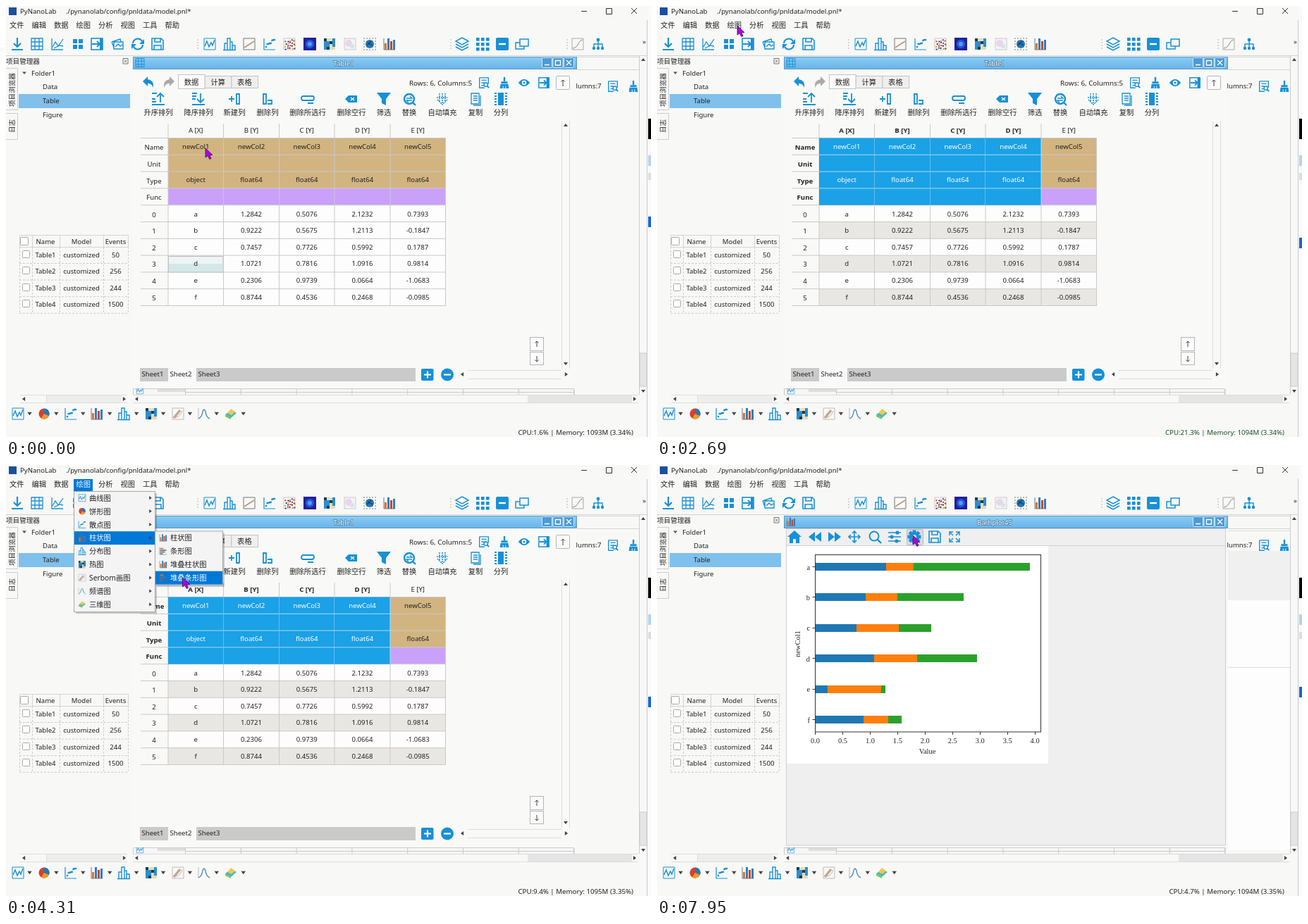
Write an HTML page that moves like this. It is 915 px wide and 612 px high and loops after 8 s.

```html
<!DOCTYPE html>
<html lang="zh">
<head>
<meta charset="utf-8">
<title>PyNanoLab</title>
<style>
html,body{margin:0;width:100%;height:100%;overflow:hidden;background:#f8f8f7}
svg{display:block;width:100vw;height:100vh}
text{font-family:'Noto Sans','Noto Sans CJK SC','Noto Sans CJK',sans-serif;font-size:9.6px;fill:#222}
.zh{font-size:10.3px}
.serif text{font-family:'Liberation Serif',serif;font-size:10.4px}
</style>
</head>
<body>
<svg id="stage" viewBox="0 0 915 612"></svg>
<script>
const BLUE = '#1790d6', SEL = '#1ba1e6', MENU = '#0078d7', LINE = '#c9c9c9';
const PLOT = ['#1f77b4', '#ff7f0e', '#2ca02c'];
const HUES = ['#d9772f', '#2b7fc0', '#c8452f', '#2b7fc0'];

const rect = (x, y, w, h, fill, stroke = 'none', more = '') =>
  `<rect x="${x}" y="${y}" width="${w}" height="${h}" fill="${fill}" stroke="${stroke}" ${more}/>`;
const path = (d, stroke = BLUE, w = 1.5, fill = 'none') =>
  `<path d="${d}" stroke="${stroke}" stroke-width="${w}" fill="${fill}"/>`;
const solid = (d, fill = BLUE) => path(d, 'none', 0, fill);
const dot = (x, y, r, fill = BLUE) => `<circle cx="${x}" cy="${y}" r="${r}" fill="${fill}"/>`;
const ring = (x, y, r, w) => `<circle cx="${x}" cy="${y}" r="${r}" fill="none" stroke="${BLUE}" stroke-width="${w}"/>`;
const text = (x, y, s, more = '') => `<text x="${x}" y="${y}" ${more}>${s}</text>`;
const zh = (x, y, s, more = '') => text(x, y, s, `class="zh" ${more}`);
const mid = (x, y, s, more = '') => text(x, y, s, `text-anchor="middle" ${more}`);
const at = (x, y, body, k = 1) => `<g transform="translate(${x} ${y}) scale(${k})">${body}</g>`;
const group = (id, body) => `<g id="${id}">${body}</g>`;
const each = (n, f) => Array.from({ length: n }, (_, i) => f(i)).join('');
const noise = i => { const v = Math.sin(i * 12.9898 + 78.233) * 43758.5453; return v - Math.floor(v); };
const tri = (x, y, dir, s = 3) =>
  `<path d="M${-s * .7} ${-s}L${s * .7} 0L${-s * .7} ${s}Z" fill="#444" transform="translate(${x} ${y}) rotate(${dir})"/>`;

const FRAME = 'M-8-8H8V8H-8Z', AXES = 'M-8-8V8H8', BEND = 'M-8-1L-1-8V-4Q8-3 7 8Q4 1-1 2V6Z';
const icon = {
  down: path('M0-9V4M-5-1L0 4L5-1M-8 8H8', BLUE, 2.2),
  grid: path(FRAME + 'M-8-3H8M-8 3H8M-3-8V8M3-8V8', BLUE, 1.3),
  chart: path(AXES + 'M-7 4L-3-3L1 3L8-7M-5 6L3 2L8 3', BLUE, 1.3),
  four: each(4, i => rect(i % 2 ? 1 : -7, i > 1 ? 1 : -7, 6, 6, BLUE)),
  into: rect(-8, -8, 16, 16, 'none', BLUE, 'stroke-width="1.6"') + rect(4, -8, 4, 16, BLUE) + path('M-7 0H3M0-4L4 0L0 4', BLUE, 2),
  cards: path('M-8-3L4-7L5-3M-5-3H8V7H-5ZM-8-3L-5 5M-3 4L1 0L4 3L7 1', BLUE, 1.4),
  refresh: path('M-7-1A7 7 0 0 1 6-4M7 1A7 7 0 0 1-6 4', BLUE, 2.2) + solid('M9-7V0H2ZM-9 7V0H-2Z'),
  save: path('M-8-8H5L8-5V8H-8ZM-4-8V-3H4V-8M-5 8V2H5V8', BLUE, 1.6),
  line: path(FRAME, BLUE, 1) + path('M-7 3L-4-4L-1 4L2-2L4 2L7-6', BLUE, 1.5),
  hist: path('M-9 8.5H9M-7 8V-1H-3M-3 8V-8H1V8M1-3H4V8M4 2H8V8', BLUE, 1.4),
  fit: path(FRAME, '#777', 1) + path('M-7 5L7-4', '#b89572', 1.5),
  scatter: path(AXES, BLUE, 1.2) + each(8, i => dot(-5 + i * 1.7, 5 - i * 1.2 - 5 * noise(i), 1.4)),
  confetti: path(FRAME, '#bbb', .8) + each(20, i => dot(-6 + i % 5 * 3 + 2 * noise(i), -6 + (i / 5 | 0) * 3.6 + 3 * noise(i + 40), 1.1, ['#d22', '#23c', '#e90', '#222'][i * 3 % 4])),
  heat: rect(-9, -9, 18, 18, '#20209c') + dot(0, 0, 6, '#2858d8') + dot(0, 0, 3, '#4ca0f0'),
  checker: rect(-8, -8, 16, 16, '#123c5c') + each(16, i => rect(-8 + i % 4 * 4, -8 + (i >> 2) * 4, 4, 4, ['#123c5c', '#2e8ecb', '#e9dcb4'][Math.floor(noise(i + 4) * 3)])),
  pale: rect(-8, -8, 16, 16, '#f3f2f7', '#ccc') + dot(-2, -1, 5, '#e8d6ec') + dot(3, 3, 3, '#cfe8df'),
  globe: each(25, i => dot(-8 + i % 5 * 4, -8 + (i / 5 | 0) * 4, 1, '#9aa')) + dot(0, 0, 6, '#2478b4') + path('M-3-2L4 2M-4 2L2-4', '#153f66', 1.4),
  bars: path(AXES, '#777', 1) + each(4, i => rect(-7 + i * 4, 8 - [9, 16, 12, 14][i], 3, [9, 16, 12, 14][i], HUES[i])),
  hbars: path(AXES, '#777', 1) + each(4, i => rect(-7, -7 + i * 4, [8, 14, 11, 6][i], 2.6, HUES[i])),
  layers: solid('M0-9L9-4L0 1L-9-4Z', '#fff') + path('M0-9L9-4L0 1L-9-4ZM-9 0L0 5L9 0M-9 4L0 9L9 4', BLUE, 1.5),
  nine: each(9, i => rect(-9 + i % 3 * 7, -9 + (i / 3 | 0) * 7, 4.6, 4.6, BLUE)),
  minus: rect(-9, -9, 18, 18, BLUE, 'none', 'rx="2"') + path('M-5 0H5', '#fff', 2.4),
  windows: path('M-3-7H9V3H-3ZM-3-2H-9V7H3V3', BLUE, 1.5),
  curve: path(FRAME, '#aaa', 1) + path('M-7 6C2 5 0-5 7-6', '#888', 1),
  tree: path('M0-4V4M-6 4V0H6V4', BLUE, 1.4) + dot(0, -6, 2.4) + dot(-6, 6, 2.2) + dot(0, 6, 2.2) + dot(6, 6, 2.2),
  pie: dot(0, 0, 7.5, '#d8402e') + solid('M0 0V-7.5A7.5 7.5 0 0 1 7 3Z', '#2677b8') + solid('M0 0L7 3A7.5 7.5 0 0 1-4 6.4Z', '#ef9a28'),
  pencil: path(FRAME, '#bbb', 1) + path('M-6 6L3-5', '#b9a99a', 3.5) + path('M-7 5Q2 7 6-4', '#e2a28c', 1),
  peak: path('M-8 7Q-3 5-2-3Q0-9 2-3Q3 5 8 7', '#4a8fb8', 1.4) + path('M-8-8V8', '#bbb', 1),
  surface: solid('M-8 1L1-5L8-1L0 6Z', '#43b9c9') + solid('M-5-1L0-7L6-3L1 2Z', '#f1c84b') + solid('M-8 1L0 6V8L-8 4Z', '#7ac74b'),
  find: path('M-7-8H7V2M-7-8V8H1M-4-4H4M-4 0H1M-4 4H0', BLUE, 1.5) + ring(3, 3, 3, 1.5) + path('M5 5L8 8', BLUE, 2),
  brush: path('M0-9V-2', BLUE, 2.6) + solid('M-5-2H5V1H-5ZM-6 2H6L7 9H-7Z') + path('M-2 5V9M2 5V9', '#fff', 1),
  eye: solid('M-9 0Q0-11 9 0Q0 11-9 0Z') + dot(0, 0, 3.6, '#fff') + dot(0, 0, 1.8),
  undo: solid(BEND),
  redo: `<g transform="scale(-1 1)">${solid(BEND, '#aaa')}</g>`,
  sortUp: path('M-9 8H9M-9 4H-3M-9 0H-4M3 5V-8M-2-3L3-8L8-3M-9-8H-2', BLUE, 1.8),
  sortDown: path('M-9 8H9M-9-4H-3M-9 0H-4M3-8V5M-2 0L3 5L8 0M-9-8H-2', BLUE, 1.8),
  addCol: path('M3-7H7V7H3ZM-8 0H0M-4-4V4', BLUE, 1.8),
  delCol: path('M-6-7H-2V7H-6ZM0 2H6V7H0', BLUE, 1.8),
  delRow: path('M-6-4H7Q9-4 9-1Q9 2 6 2H-6Q-9 2-9-1Q-9-4-6-4M0 6H8', BLUE, 1.8),
  erase: solid('M-9 0L-4-5H8V5H-4Z') + path('M-1-2L4 2M4-2L-1 2', '#fff', 1.4),
  funnel: solid('M-10-9H10L3 0V9L-3 6V0Z'),
  swap: ring(0, 0, 7, 2.4) + path('M-4-1H4L1-4M4 2H-4L-1 5', BLUE, 1.4) + path('M5 5L9 9', BLUE, 2.4),
  fill: `<path d="M0-8V7M-4-8V3M4-8V3M-7 1L0 8L7 1M-8-2H8" fill="none" stroke="${BLUE}" stroke-width="1.5" stroke-dasharray="2 1"/>`,
  copy: path('M-6-8H5V7H-6ZM-3-4H3M-3-1H3M-3 2H3M7-5V9H-3', BLUE, 1.3),
  split: rect(-4, -9, 8, 18, BLUE) + each(5, i => rect(-9, -9 + i * 4, 3, 2, BLUE) + rect(6, -9 + i * 4, 3, 2, BLUE)),
  home: solid('M-10 0L0-9L10 0H7V9H2V3H-2V9H-7V0Z'),
  back: solid('M-9 0L0-7V7ZM0 0L9-7V7Z'),
  next: solid('M9 0L0-7V7ZM0 0L-9-7V7Z'),
  move: path('M-8 0H8M0-8V8M-5-3L-8 0L-5 3M5-3L8 0L5 3M-3-5L0-8L3-5M-3 5L0 8L3 5', BLUE, 1.6),
  zoom: ring(-1, -1, 6.5, 2) + path('M4 4L9 9', BLUE, 2.4),
  sliders: path('M-9-6H9M-9 0H9M-9 6H9', BLUE, 1.6) + dot(4, -6, 2.6) + dot(-4, 0, 2.6) + dot(3, 6, 2.6),
  gear: each(8, i => `<rect x="-2.4" y="-9.5" width="4.8" height="5" fill="${BLUE}" transform="rotate(${i * 45})"/>`) + ring(0, 0, 5, 4),
  expand: path('M-7-2V-7H-2M2-7H7V-2M7 2V7H2M-2 7H-7V2M-6-6L-2-2M6-6L2-2M6 6L2 2M-6 6L-2 2', BLUE, 1.5)
};
// "x:name" pairs placed on one row
const row = (y, list, k = 1) => list.split(' ').map(p => {
  const [x, name] = p.split(':');
  return at(x, y, icon[name], k);
}).join('');
const handle = x => each(4, i => dot(x, 48 + i * 4, .8, '#aaa'));

function base() {
  const side = ['50', '256', '244', '1500'];
  const menus = '文件 编辑 数据 绘图 分析 视图 工具 帮助'.split(' ');
  return rect(0, 0, 915, 612, '#f8f8f7') +
    rect(4, 2, 11, 11, '#1c4f9c') + text(20, 11, 'PyNanoLab') + text(85, 11, './pynanolab/config/pnldata/model.pnl*') +
    path('M816 7.5H824M851.5 3.5H859.5V11.5H851.5ZM887 3L895 11M895 3L887 11', '#333', 1) +
    menus.map((s, i) => zh(5 + i * 31.5, 31, s)).join('') +
    row(54, '16:down 44:grid 73:chart 102:four 129:into 158:cards 187:refresh 215:save 289:line 317:hist 345:fit 374:scatter 402:confetti 431:heat 459:checker 488:pale 516:globe 544:bars 647:layers 676:nine 704:minus 732:windows 811:curve 840:tree') +
    handle(272) + handle(631) + handle(796) + text(903, 54, '»') +
    path('M0 70.5H909', '#d2d2d2', 1) +
    text(0, 81.5, '项目管理器') + path('M166 74.5H173V82H166ZM168 76.5L171 80M171 76.5L168 80', '#666', .9) +
    path('M0 88.5H16.5V147.5H0M0 152.5H16.5V189.5H0', '#ccc', 1) +
    text(0, 0, '项目浏览器', 'transform="translate(11.5 143) rotate(-90)"') + text(0, 0, '日志', 'transform="translate(11.5 180) rotate(-90)"') +
    rect(18, 125, 158, 20, '#80c0ec') + path('M23 93.5H29L26 97Z', 'none', 0, '#555') +
    text(36, 98.5, 'Folder1') + text(52, 118, 'Data') + text(52, 138, 'Table') + text(52, 157.5, 'Figure') +
    path('M19.5 325.5H173.5V342.5H19.5ZM37.5 325V342M76.5 325V342M138.5 325V342', '#d4d4d4', 1) +
    `<path d="M19.5 342V436M37.5 342V436M76.5 342V436M138.5 342V436M173.5 342V436${each(4, i => `M19 ${365.5 + i * 23.6}H174`)}" stroke="#ccc" stroke-dasharray="3 2"/>` +
    rect(20.5, 328.5, 11, 11, '#fff', '#aaa', 'rx="1"') + mid(56, 338, 'Name') + mid(107, 338, 'Model') + mid(155.5, 338, 'Events') +
    side.map((n, i) => {
      const y = 356.5 + i * 23.6;
      return rect(23.5, Math.round(y) - 9.5, 10, 10, '#fff', '#aaa', 'rx="1"') + mid(56, y, 'Table' + (i + 1)) + mid(107, y, 'customized') + mid(155.5, y, n);
    }).join('') +
    // sub-window strip and scroll bars
    rect(180.5, 543.5, 625, 9, '#f6f6f6', '#ccc') + rect(215, 544, 39, 4, '#dedede') + at(190, 546, icon.line, .6) +
    path('M254 548.5H806' + each(8, i => `M${254.5 + i * 78.8} 544V552`), LINE, 1) +
    path('M20 552.5H172M180 552.5H897M20 563.5H172M180 563.5H897M57.5 553V563', '#ddd', 1) +
    rect(58, 553, 106, 10, '#ededed') + rect(740, 553, 148, 10, '#e5e5e5') +
    tri(25, 558, 180) + tri(168, 558, 0) + tri(185, 558, 180) + tri(892, 558, 0) +
    path('M898.5 70V552M909.5 20V612', '#ccc', 1) + rect(899, 493, 10, 47, '#e5e5e5', '#ccc') + tri(904, 76, -90) + tri(904, 547, 90) +
    row(579, '17:line 54:pie 92:scatter 129:bars 167:hist 206:checker 244:pencil 281:peak 319:surface') +
    each(9, i => tri(33.5 + i * 37.9, 579, 90, 3.2)) +
    rect(911, 0, 4, 612, '#fafafa') + rect(911, 160, 4, 29, '#000') + rect(911, 212, 4, 15, '#b6d3ee') + rect(911, 237, 4, 10, '#ddd') +
    group('strip', rect(911, 0, 4, 15, '#1668c8'));
}

// The window that shows to the right of the open one
const neighbour = () => path('M810 72.5H898M810 90.5H898', '#d5d5d5', 1) +
  `<g style="clip-path:inset(0 0 0 .5px)">${text(808.5, 117, 'lumns:7')}</g>` + row(114, '861:find 890:brush', .9);

function frame(title, name) {
  return rect(180.5, 72.5, 629, 17, 'url(#bar)', '#5797c8') + at(190, 80.5, icon[name], .75) +
    mid(479, 84.5, title, 'style="fill:#fff;stroke:#47779a;stroke-width:1.3;paint-order:stroke"') +
    each(3, i => rect(760.5 + i * 15.5, 73.5, 14, 14, '#4d9bd6', '#cfe8fa', 'rx="1"')) +
    path('M764 83.5H771M779.5 77.5H786.5V84H779.5ZM795 77L802 84M802 77L795 84', '#fff', 1.3);
}

const X = [230, 308.5, 387.5, 466, 545, 623.5];
const cx = i => (X[i] + X[i + 1]) / 2;
const rowY = i => 187.5 + i * 23.8;
const DATA = [
  [1.2842, .5076, 2.1232, .7393], [.9222, .5675, 1.2113, -.1847], [.7457, .7726, .5992, .1787],
  [1.0721, .7816, 1.0916, .9814], [.2306, .9739, .0664, -1.0683], [.8744, .4536, .2468, -.0985]
];

function tableWindow() {
  const tools = '216:sortUp:升序排列 273:sortDown:降序排列 324:addCol:新建列 371:delCol:删除列 428:delRow:删除所选行 490:erase:删除空行 536:funnel:筛选 572:swap:替换 619:fill:自动填充 666:copy:复制 702:split:分列';
  const type = c => c ? 'float64' : 'object';
  const lines = each(11, i => `M191 ${rowY(i)}H623.5`) + X.map(x => `M${x} 187V426`).join('') + X.slice(0, 5).map(x => `M${x} 167V187`).join('');
  return rect(180, 90, 629, 453, '#f9f9f8') + frame('Table1', 'grid') +
    row(108, '202:undo 231:redo') +
    ['数据', '计算', '表格'].map((s, i) => rect(244.5 + i * 37.7, i ? 99.5 : 97.5, 37.7, i ? 17 : 20, i ? '#efefef' : '#fbfbfb', '#c4c4c4') + zh(263 + i * 37.7, 111.5, s, 'text-anchor="middle"')).join('') +
    text(572, 113, 'Rows: 6, Columns:5', 'style="font-size:9.8px"') + row(109, '678:find 707:brush 735:eye 763:into', .9) +
    rect(780.5, 99.5, 19, 19, '#fbfbfb', '#b5b5b5', 'rx="1"') + path('M790 114V105M787.5 107.5L790 105L792.5 107.5', '#444', 1) +
    tools.split(' ').map(s => {
      const [x, name, label] = s.split(':');
      return at(x, 132, icon[name]) + zh(x, 155, label, 'text-anchor="middle"');
    }).join('') +
    rect(230, rowY(0), 393.5, 71.4, '#d2b481') + rect(230, rowY(3), 393.5, 23.8, '#c9a1fb') +
    rect(230, rowY(4), 393.5, 142.8, '#fdfdfd') +
    group('stripes', each(3, i => rect(230, rowY(5 + 2 * i), 393.5, 23.8, '#e9e7e3'))) +
    group('cell', rect(230.5, 355.5, 77.5, 22.5, '#eef4f4', '#bbb') + rect(231, 366, 76.5, 11.5, '#d3e8e9')) +
    path(lines, LINE, 1) +
    group('heads', each(5, c => mid(cx(c), 180, `${'ABCDE'[c]} [${c ? 'Y' : 'X'}]`))) +
    group('rowHeads', ['Name', 'Unit', 'Type', 'Func'].map((s, i) => mid(210, 204 + i * 23.8, s)).join('')) +
    each(6, i => mid(210, 299.5 + i * 23.6, i)) +
    each(5, c => mid(cx(c), 202.5, 'newCol' + (c + 1)) + mid(cx(c), 249.5, type(c))) +
    DATA.map((d, i) => mid(cx(0), 298.5 + i * 23.6, 'abcdef'[i]) + d.map((v, c) => mid(cx(c + 1), 298.5 + i * 23.6, v.toFixed(4))).join('')).join('') +
    each(4, c => group('sel' + c, rect(X[c], rowY(0), X[c + 1] - X[c], 95.2, SEL) +
      path(each(3, i => `M${X[c]} ${rowY(i + 1)}H${X[c + 1]}`) + `M${X[c + 1]} 187.5V282.7`, '#a9d9f4', 1) +
      mid(cx(c), 202.5, 'newCol' + (c + 1), 'style="fill:#fff"') + mid(cx(c), 249.5, type(c), 'style="fill:#fff"'))) +
    path('M788.5 163V515M799.5 163V515', '#ddd', 1) + tri(794, 169, -90) + tri(794, 508, 90) +
    rect(743.5, 470.5, 19, 19, '#fbfbfb', '#b5b5b5') + rect(743.5, 491.5, 19, 18, '#fbfbfb', '#b5b5b5') +
    path('M753 484V476M750.5 478.5L753 476L755.5 478.5M753 497V505M750.5 502.5L753 505L755.5 502.5', '#444', 1) +
    rect(190, 514, 391, 19, '#cacaca') + rect(230, 514, 40, 19, '#fafafa') +
    text(192.5, 526, 'Sheet1') + text(232.5, 526, 'Sheet2') + text(272.5, 526, 'Sheet3') +
    rect(589, 515, 17.5, 17, BLUE, 'none', 'rx="2"') + path('M593 523.5H603M598 518.5V528.5', '#fff', 2.2) +
    dot(626, 523.5, 9) + path('M621 523.5H631', '#fff', 2.2) +
    path('M655 517.5H788M655 529.5H788', '#ddd', 1) + tri(647, 523, 180) + tri(795, 523, 0);
}

const UNIT = 77.9, AX = 224.5;
function plotWindow() {
  const barY = i => 144.5 + i * 43.4;
  const bars = DATA.map((d, i) => {
    let x = AX;
    return d.slice(0, 3).map((v, k) => {
      const left = Math.round(x);
      x += v * UNIT;
      return rect(left, Math.round(barY(i) - 5.5), Math.round(x) - left, 11, PLOT[k]);
    }).join('') + text(217, barY(i) + 4, 'abcdef'[i], 'text-anchor="end"');
  }).join('');
  const ticks = each(6, i => `M220.5 ${Math.floor(barY(i)) + .5}H224`) + each(9, i => `M${Math.floor(AX + i * UNIT / 2) + .5} 379V383`);
  return rect(810, 122, 88, 70, '#f0f0f0') + rect(810, 192, 88, 355, '#fdfdfd') + path('M810 287.5H898M810 93.5H898', '#ddd', 1) +
    rect(180, 90, 629, 453, '#f8f8f8') + rect(183.5, 90.5, 623, 449.5, '#efefef', '#cfcfcf') + frame('Barhplot45', 'bars') +
    group('hover', rect(354.5, 91.5, 23, 22, '#d9dcdf', '#bbb', 'rx="1"')) +
    row(102, '195:home 224:back 252:next 280:move 309:zoom 337:sliders 365:gear 394:save 422:expand') +
    path('M184 114.5H806', '#d0d0d0', 1) + text(761, 105, '', 'id="coord"') +
    rect(184, 115, 371, 309, '#fff') +
    `<g class="serif">${bars}${path(ticks, '#222', .9)}${rect(224.5, 127.5, 320, 251.5, 'none', '#333')}` +
    each(9, i => mid(AX + i * UNIT / 2, 395, (i / 2).toFixed(1))) + mid(383.5, 410, 'Value') +
    mid(0, 0, 'newCol1', 'transform="translate(202.5 254) rotate(-90)"') + '</g>';
}

const STEP = 18.9;
function menuList(id, x, y, w, items, icons) {
  return group(id, rect(x + 3, y + 3, w, items.length * STEP + 1, '#0003') + rect(x + .5, y + .5, w, items.length * STEP + 1, '#f4f4f4', '#a8a8a8') +
    rect(x + 1, 0, w - 1, STEP, MENU, 'none', `id="${id}Hot"`) +
    items.map((s, i) => {
      const cy = y + 9.7 + i * STEP;
      return at(x + 12, cy, icon[icons[i]], .62) + zh(x + 22, cy + 4, s) + (id === 'menu' ? tri(x + 109, cy, 0, 2.6) : '');
    }).join(''));
}

const stage = document.getElementById('stage');
stage.innerHTML =
  '<defs><linearGradient id="bar" x2="0" y2="1"><stop stop-color="#8accf5"/><stop offset="1" stop-color="#68b3e8"/></linearGradient></defs>' +
  base() + group('table', tableWindow()) + group('plot', plotWindow()) + neighbour() +
  group('menuTop', rect(96, 20, 27, 17, MENU) + zh(99.5, 31, '绘图', 'style="fill:#fff"')) +
  menuList('menu', 96, 37, 115, '曲线图 饼形图 散点图 柱状图 分布图 热图 Serbom画图 频谱图 三维图'.split(' '), 'line pie scatter bars hist checker pencil peak surface'.split(' ')) +
  menuList('sub', 211, 93.5, 96, '柱状图 条形图 堆叠柱状图 堆叠条形图'.split(' '), 'bars hbars bars hbars'.split(' ')) +
  text(890, 609, '', 'id="status" text-anchor="end" style="font-size:9.7px"') +
  group('cursor', path('M0 0V13L3.2 10.6L5.8 15.5L8 14.4L5.8 9.6H10Z', '#40005a', .8, '#b000e6'));

const el = {};
stage.querySelectorAll('[id]').forEach(n => el[n.id] = n);
const show = (id, on) => el[id].style.display = on ? '' : 'none';

const TRACK = [
  [60, 283, 202], [580, 268, 180], [920, 268, 180], [1680, 484, 183], [1740, 484, 183], [1790, 489, 185],
  [2100, 489, 185], [2690, 114, 28], [2790, 92, 28], [2880, 104, 28], [2940, 104, 28], [3670, 148, 104],
  [3730, 157, 104], [3770, 157, 104], [4000, 216, 106], [4370, 253, 164], [4530, 253, 164], [4770, 265, 163],
  [5260, 265, 163], [5790, 465, 318], [5950, 465, 318], [6120, 469, 300], [6550, 469, 300], [6990, 546, 165],
  [7420, 546, 165], [7950, 363, 100]
];
const LOAD = [
  [0, 1.6, 1093, 3.34], [920, 6, 1095, 3.35], [1740, 5.3, 1094, 3.34], [2640, 21.3, 1094, 3.34], [3610, 9.4, 1095, 3.35],
  [4580, 12.5, 1094, 3.34], [5600, 90.1, 1096, 3.35], [6600, 6.2, 1094, 3.35], [7500, 4.7, 1094, 3.35]
];
const STRIP = [[0, 299], [920, 314], [2100, 329], [5400, 315]];
const current = (list, t) => list.filter(k => k[0] <= t).pop();

function pointer(t) {
  const i = TRACK.findIndex(k => k[0] > t);
  if (i < 1) return (i ? TRACK[TRACK.length - 1] : TRACK[0]).slice(1);
  const [a, b] = [TRACK[i - 1], TRACK[i]];
  const u = (t - a[0]) / (b[0] - a[0]), e = u * u * (3 - 2 * u);
  return [a[1] + (b[1] - a[1]) * e, a[2] + (b[2] - a[2]) * e];
}

function highlight(id, top, index, count) {
  const on = index >= 0 && index < count;
  show(id + 'Hot', on);
  el[id + 'Hot'].setAttribute('y', top + .5 + index * STEP);
  el[id].querySelectorAll('text').forEach((n, i) => n.style.fill = on && i === index ? '#fff' : '');
}

function draw(t) {
  const [x, y] = pointer(t);
  el.cursor.setAttribute('transform', `translate(${x.toFixed(1)} ${y.toFixed(1)})`);

  const picked = t < 920 ? 0 : t > 1680 ? 4 : X.filter(v => v < x).length;
  for (let c = 0; c < 4; c++) {
    show('sel' + c, c < picked);
    el.heads.children[c].style.fontWeight = c < picked && picked > 1 ? 700 : 400;
  }
  el.rowHeads.style.fontWeight = picked ? 700 : 400;
  show('stripes', picked);
  show('cell', !picked);

  const open = t >= 2820 && t < 5260, sub = t >= 3600 && t < 5260;
  show('menuTop', t >= 2820 && t < 5400);
  show('menu', open);
  show('sub', sub);
  highlight('menu', 37, sub ? 3 : Math.floor((y - 37) / STEP), 9);
  highlight('sub', 93.5, x > 211 ? Math.floor((y - 93.5) / STEP) : -1, 4);

  const plot = t >= 5450;
  show('table', !plot);
  show('plot', plot);
  const inside = x > AX && x < 544 && y > 127 && y < 379;
  el.coord.textContent = inside ? `x=${((x - AX) / UNIT).toFixed(2)} y=` : '';
  show('hover', x > 353 && x < 378 && y < 114);

  const [, cpu, mem, share] = current(LOAD, t);
  el.status.textContent = `CPU:${cpu.toFixed(1)}% | Memory: ${mem}M (${share}%)`;
  el.status.style.fill = cpu >= 10 ? '#1c4f2a' : '#222';
  el.strip.setAttribute('transform', `translate(0 ${current(STRIP, t)[1]})`);
}

const start = performance.now();
function tick() {
  draw((performance.now() - start) % 8000);
  requestAnimationFrame(tick);
}
tick();
</script>
</body>
</html>
```
